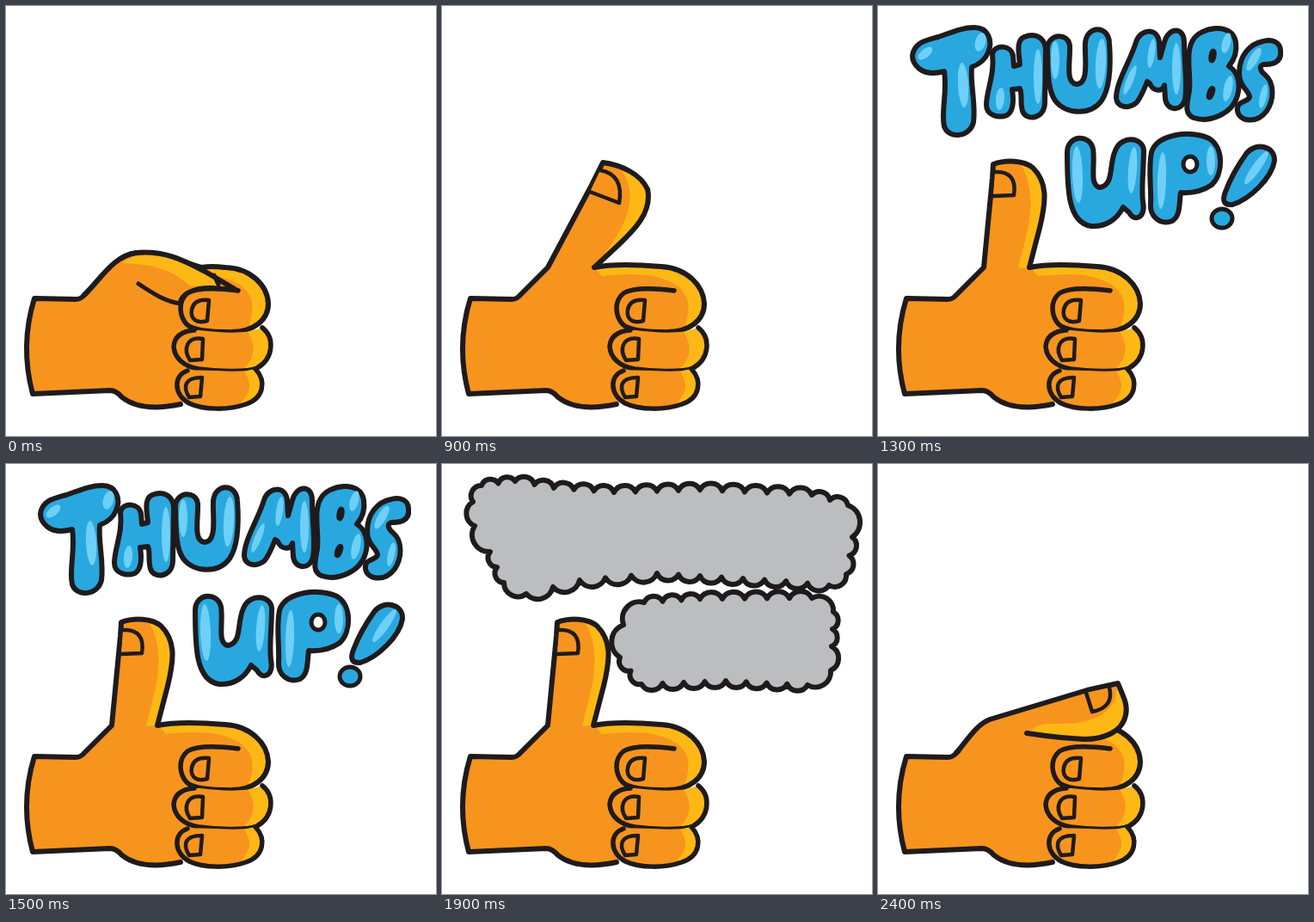
Write an HTML page that moves like this. It is 500 by 500 pixels and loops after 2.5 s.

```html
<!DOCTYPE html>
<html lang="en">
<head>
<meta charset="utf-8">
<title>Thumbs up</title>
<style>
html, body { margin: 0; width: 100%; height: 100%; overflow: hidden; background: #fff; }
svg { display: block; width: 100vw; height: 100vh; }
path, ellipse { stroke-linecap: round; stroke-linejoin: round; }
</style>
</head>
<body>
<svg id="stage" viewBox="0 0 500 500"></svg>
<script>
const INK = '#1f1b1c', ORANGE = '#f7941e', YELLOW = '#fdb815';
const BLUE = '#29a8e0', SHINE = '#6fd0f7', GREY = '#bbbdbf';
const stage = document.getElementById('stage');

const shape = (d, fill = 'none', width = 0) =>
  `<path d="${d}" fill="${fill}"${width ? ` stroke="${INK}" stroke-width="${width}"` : ''}/>`;
const oval = (x, y, rx, ry, turn, fill, width = 0) =>
  `<ellipse cx="${x}" cy="${y}" rx="${rx}" ry="${ry}" transform="rotate(${turn} ${x} ${y})" fill="${fill}" stroke="${INK}" stroke-width="${width}"/>`;

function layer(html) {
  const g = document.createElementNS('http://www.w3.org/2000/svg', 'g');
  g.innerHTML = html;
  stage.append(g);
  return g;
}

// Hand
const WRIST = 'M203 463C165 471 145 463 135 455Q128 447 121 447L31 451Q16 395 33 340L81 341Q87 341 91 336';
const KNUCKLE = 'C285 305 304 325 305 346C305 365 288 379 262 379';
const OPEN = 'C200 299 232 301 255 303';

const INDEX_SHADE = 'M177 304' + OPEN + KNUCKLE + 'L280 378C291 352 288 336 272 324C248 309 215 311 186 314Z';

const fingers =
  shape('M270 331C245 328 222 327 211 334C199 344 202 361 210 370C218 378 240 379 262 379', ORANGE, 5.5) +
  shape('M236 342L234 366C222 370 214 364 216 353C218 343 226 341 236 342Z', ORANGE, 4.5) +
  shape('M298 374C313 386 311 410 292 421C278 427 240 424 224 422C206 419 196 409 195 396C196 383 210 376 225 377C250 380 280 382 298 374Z', ORANGE) +
  shape('M298 374C313 386 311 410 292 421L273 425C291 410 291 394 281 379Z', YELLOW) +
  shape('M298 374C313 386 311 410 292 421C278 427 240 424 224 422C206 419 196 409 195 396C196 383 206 378 219 377', 'none', 5.5) +
  shape('M229 387L228 411L214 412C206 400 209 384 229 387Z', ORANGE, 4.5) +
  shape('M290 422C303 436 300 456 279 463C259 470 230 470 213 462C195 452 194 430 211 424C240 422 268 428 290 422Z', ORANGE) +
  shape('M290 422C303 436 300 456 279 463L268 466C285 452 287 440 277 425Z', YELLOW) +
  shape('M290 422C303 436 300 456 279 463C259 470 230 470 213 462C195 452 194 430 211 424', 'none', 5.5) +
  shape('M228 432L226 454L213 455C205 442 208 432 228 432Z', ORANGE, 4.5);

function hand({ top, shade = '', nail = '', over = '' }) {
  const body = WRIST + top + KNUCKLE;
  return shape(body, ORANGE) + shape(INDEX_SHADE, YELLOW) + (shade && shape(shade, YELLOW)) +
    shape(body, 'none', 6) + (nail && shape(nail, ORANGE, 4.5)) + over + fingers;
}

const FIST = 'M91 336C110 318 125 290 152 287C185 284 207 296 232 309L269 331L240 328C222 327 203 334 203 346';
const CURL = 'M91 336C106 318 115 303 130 297L243 263L279 255C285 270 291 280 288 292C284 312 262 320 240 320C218 319 200 317 173 313';

const poses = {
  fist: hand({
    top: 'C110 318 125 290 152 287C180 285 205 298 228 304C238 302 246 303 255 304',
    over: shape(FIST + 'L154 323', ORANGE) +
      shape('M136 299C150 284 186 284 232 309L248 322L240 328C225 325 212 327 212 324C190 304 165 300 136 299Z', YELLOW) +
      shape(FIST, 'none', 6) + shape('M242 313L247 324M154 323C172 335 186 344 203 346', 'none', 5)
  }),
  curl: hand({
    top: 'C110 318 118 305 140 305L255 304',
    over: shape(CURL, ORANGE) +
      shape('M279 255C285 270 291 280 288 292C284 312 262 320 240 320C218 319 200 317 176 313C182 303 190 302 210 302C245 303 270 292 276 271Z', YELLOW) +
      shape(CURL, 'none', 6) + shape('M242 266L249 288C266 285 273 275 269 260', ORANGE, 4.5)
  }),
  tilt: hand({
    top: 'L123 304L172 212L187 182C210 185 231 196 239 213C245 240 222 262 205 278L177 304' + OPEN,
    shade: 'M207 188C229 196 239 205 239 213C245 240 222 262 205 278L177 304C214 258 232 222 207 188Z',
    nail: 'M184 191C202 194 210 207 206 229L172 216'
  }),
  lean: hand({
    top: 'L123 304L168 212L183 183C203 182 225 186 231 207C234 232 213 262 201 277L177 304' + OPEN,
    shade: 'M204 186C222 189 229 198 231 207C234 232 213 262 201 277L177 304C207 258 224 222 204 186Z',
    nail: 'M178 194C194 191 202 206 191 226L168 216'
  }),
  up: hand({
    top: 'L123 304L133 200L134 184C150 178 170 180 180 188C197 205 196 225 188 258L176 304' + OPEN,
    shade: 'M165 182C180 185 191 199 193 218C193 240 182 270 176 304L163 305C171 270 190 222 165 182Z',
    nail: 'M136 193C153 192 161 201 158 220L134 221'
  })
};

// Lettering: outline plus shines [x, y, rx, ry, turn]
const letters = [
  ['M40 58C42 42 56 40 70 36C85 31 97 25 112 25C128 25 134 40 128 54C124 64 117 68 109 71C107 90 114 115 111 135C107 153 82 155 77 140C73 122 81 100 77 76C66 79 56 79 48 73C42 68 40 64 40 58Z',
    [[55, 55, 5, 10, 50], [119, 42, 6, 11, 15], [99, 92, 6, 26, -3]]],
  ['M133 56C136 44 155 45 157 58L158 70L165 68C164 56 160 40 170 36C184 30 195 38 195 52L194 112C194 132 172 134 168 122C165 112 168 104 165 96L156 97C158 110 158 122 150 127C140 131 126 127 126 115C126 98 136 80 133 56Z',
    [[142, 108, 5, 13, 5], [186, 82, 5, 32, 0]]],
  ['M197 50C197 32 221 30 223 46C224 62 217 90 231 91C246 90 240 60 241 43C243 22 268 22 269 43C271 70 270 95 260 110C247 128 218 126 206 110C196 95 198 70 197 50Z',
    [[206, 63, 5, 22, 0], [259, 67, 6, 29, 3]]],
  ['M277 107C277 88 293 65 300 42C305 26 325 25 327 42L328 60L333 42C338 24 356 24 356 42C356 70 360 90 357 108C353 124 336 122 334 108L333 92C331 100 320 100 316 90L313 88C309 98 305 108 300 113C291 120 278 118 277 107Z',
    [[293, 86, 4, 18, 22], [318, 55, 4, 17, 8], [347, 73, 5, 30, 0]]],
  ['M366 40C375 24 412 18 416 42C418 55 413 64 408 70C418 76 422 90 418 104C412 126 385 136 367 130C355 125 360 112 362 98C364 78 357 55 366 40Z',
    [[405, 43, 5, 12, 15], [407, 96, 5, 15, 12]], [[389, 58, 2, 6, 10, INK], [387, 101, 2, 6, 20, INK]]],
  ['M468 52C470 68 455 68 448 68C442 70 445 76 450 80C462 90 460 110 452 122C440 138 420 134 418 122C416 110 430 112 432 106C432 98 420 95 420 78C420 58 432 44 448 41C458 38 468 42 468 52Z',
    [[437, 62, 5, 15, 30], [448, 105, 4, 14, 12]]],
  ['M220 170C220 150 246 148 250 166C253 185 245 208 258 211C275 208 268 185 276 168C283 150 308 152 309 168C309 190 306 210 308 228C312 246 298 252 292 240L285 234C278 248 265 257 248 256C220 252 220 210 220 170Z',
    [[232, 196, 6, 33, -2], [296, 191, 5, 27, 4]]],
  ['M318 170C325 148 365 144 385 154C402 164 402 195 388 208C376 216 364 218 352 217C350 230 352 244 342 250C328 255 316 245 317 230C318 210 314 190 318 170Z',
    [[330, 203, 5, 33, 2], [387, 180, 5, 17, 0]], [[363, 184, 8, 9, 0, '#fff']]],
  ['M428 172C438 158 462 162 461 180C458 200 432 225 412 231C402 232 400 226 404 216C410 200 418 186 428 172Z',
    [[440, 188, 5, 23, 35]], [[400, 247, 12, 11, 0, BLUE]]]
];
const letter = ([d, shines, extras = []]) => '<g>' + shape(d, BLUE, 6) +
  shines.map(s => oval(...s, SHINE)).join('') + extras.map(e => oval(...e, 5)).join('') + '</g>';

// Scalloped cloud around a list of corners
function cloud(pts) {
  let d = `M${pts[0]}`;
  pts.forEach(([x, y], i) => {
    const [u, v] = pts[(i + 1) % pts.length];
    const len = Math.hypot(u - x, v - y), n = Math.max(1, Math.round(len / 26)), r = len / n * 0.56;
    for (let k = 1; k <= n; k++) d += `A${r} ${r} 0 0 1 ${x + (u - x) * k / n} ${y + (v - y) * k / n}`;
  });
  return shape(d + 'Z', GREY, 6);
}
const clouds =
  cloud([[36, 44], [46, 25], [85, 20], [130, 28], [200, 33], [300, 30], [430, 36], [472, 48], [477, 85], [470, 128], [450, 141], [400, 136], [250, 127], [160, 135], [98, 151], [72, 138], [56, 102], [38, 72]]) +
  cloud([[211, 187], [235, 161], [300, 157], [430, 156], [455, 172], [453, 212], [452, 240], [425, 257], [330, 252], [232, 256], [207, 225]]);

// Debris: x, y, lobes, radius, turn, squash
const bits = [
  [39, 58, 5, 20, 10, .9], [174, 36, 4, 20, 40, .72], [262, 46, 2, 16, -5, .75], [397, 33, 2, 16, -50, .9],
  [470, 53, 2, 18, -12, .8], [137, 90, 1, 9, -35, .6], [381, 94, 1, 9, -15, .6], [465, 184, 1, 10, 10, .7],
  [182, 123, 3, 16, -20, .8], [274, 125, 3, 16, -35, .9], [467, 123, 3, 17, -55, .95], [208, 190, 3, 14, -60, 1],
  [470, 246, 3, 17, 30, .95], [77, 143, 4, 18, 40, .95], [345, 244, 4, 18, 40, .85],
  [41, 137, 0, 7, 0, .8], [50, 171, 0, 7, 0, .8], [359, 175, 0, 9, -30, .85], [227, 242, 0, 6, 0, .9]
];
function bit([x, y, lobes, r, turn, squash], size) {
  const depth = [0, .2, .4, .32, .24, .16][lobes];
  let d = '';
  for (let a = 0; a < 360; a += 6) {
    const t = a * Math.PI / 180, q = r * size * (1 - depth + depth * Math.cos(lobes * t));
    d += (a ? 'L' : 'M') + (q * Math.cos(t)).toFixed(1) + ' ' + (q * Math.sin(t) * squash).toFixed(1);
  }
  return `<g transform="translate(${x} ${y}) rotate(${turn})">${shape(d + 'Z', GREY, 4.5)}</g>`;
}
const debris = size => bits.map(b => bit(b, size)).join('');

const layers = {};
for (const name in poses) layers[name] = layer(poses[name]);
layers.words = layer(letters.map(letter).reverse().join(''));
layers.cloud = layer(clouds);
layers.chunks = layer(debris(1.3));
layers.bits = layer(debris(1));
layers.crumbs = layer(debris(.45));
const glyphs = [...layers.words.children];

// start, pose, effect, x scale, y scale, bob
const steps = [
  [0, 'fist'],
  [400, 'curl'],
  [900, 'tilt'],
  [1000, 'up', 'words', .4, .4],
  [1100, 'up', 'words', .8, .8],
  [1200, 'up', 'words', 1, 1.06],
  [1300, 'up', 'words'],
  [1400, 'up', 'words', 1, 1, 2],
  [1500, 'up', 'words'],
  [1600, 'up', 'words', 1, 1, 2],
  [1700, 'up', 'words'],
  [1800, 'up', 'cloud', .92, .92],
  [1900, 'up', 'cloud'],
  [2000, 'up', 'cloud', 1.03, 1.04],
  [2100, 'up', 'chunks'],
  [2200, 'lean', 'bits'],
  [2300, 'tilt', 'crumbs'],
  [2400, 'curl']
];

let shown;
function draw() {
  const t = performance.now() % 2500;
  const step = steps.findLast(s => s[0] <= t);
  if (step !== shown) {
    shown = step;
    const [, pose, effect, sx = 1, sy = 1, bob = 0] = step;
    for (const name in layers)
      layers[name].style.display = name === pose || name === effect ? '' : 'none';
    if (effect) layers[effect].setAttribute('transform', `translate(255 140) scale(${sx} ${sy}) translate(-255 -140)`);
    glyphs.forEach((g, i) => g.setAttribute('transform', `translate(0 ${i % 2 ? bob : -bob})`));
  }
  requestAnimationFrame(draw);
}
draw();
</script>
</body>
</html>
```
